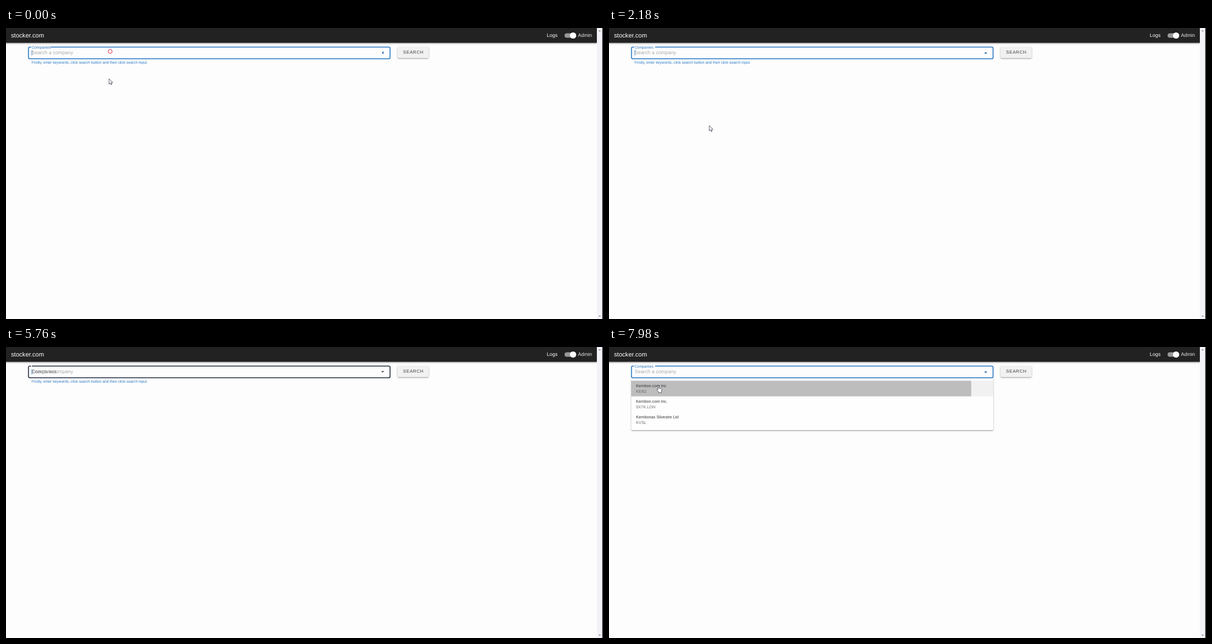
Write an HTML page that moves like this. It is 1072 by 522 pixels and loops after 8 s.

```html
<!DOCTYPE html>
<html lang="en">
<head>
<meta charset="utf-8">
<title>stocker.com</title>
<style>
  html, body { margin: 0; width: 100%; height: 100%; overflow: hidden; background: #fdfdfd; }
  svg { display: block; width: 1072px; height: 522px; }
  text { font: 8.93px "Liberation Sans", Arial, sans-serif; text-rendering: geometricPrecision; white-space: pre; }
  .option { font-size: 7.25px; fill: #333; }
  .ticker { font-size: 7.25px; fill: #6b6b6b; }
</style>
</head>
<body>
<svg viewBox="0 0 1072 522">
  <defs>
    <filter id="shadow" x="-10%" y="-30%" width="120%" height="170%">
      <feDropShadow dx="0" dy="1.2" stdDeviation="1.2" flood-opacity=".4"/>
    </filter>
    <clipPath id="buttonClip"><rect x="703" y="33.5" width="56" height="20.3" rx="2.2"/></clipPath>
    <clipPath id="rowClip"><rect x="40" y="60.5" width="650" height="28"/></clipPath>
  </defs>
  <rect width="1072" height="522" fill="#fdfdfd"/>

  <rect x="-8" y="-4" width="1069" height="30.6" fill="#242424" filter="url(#shadow)"/>
  <text x="9" y="17" fill="#fff" style="font-size:11.1px">stocker.com</text>
  <text x="971" y="16.4" fill="#fff">Logs</text>
  <rect x="1003" y="9.6" width="19" height="7.8" rx="3.9" fill="#989898"/>
  <circle cx="1018.3" cy="13.5" r="5.6" fill="#fff"/>
  <text x="1027" y="16.4" fill="#e6e6e6">Admin</text>

  <rect x="1061" width="9.6" height="522" fill="#f3f2f8"/>
  <rect x="1070.7" width="1.3" height="522" fill="#17171c"/>
  <path d="M1064 6l2-2 2 2zM1064 516l2 2 2-2z" fill="#777"/>

  <rect id="outline" x="40.4" y="34.2" width="649.2" height="21" rx="2.2" fill="none"/>
  <rect id="notch" x="44.8" y="33" height="2.4" fill="#fdfdfd"/>
  <text id="placeholder" x="46" y="47.3" fill="#a9a9a9">Search a company</text>
  <text id="typed" x="46" y="47.3" fill="#333"></text>
  <text id="label" x="46">Companies</text>
  <rect id="caret" y="39.7" width=".8" height="9.6" fill="#2a74bd"/>
  <path id="arrow" d="M-2.9-1.4H2.9L0 1.5Z"/>
  <text id="helper" x="46" y="63.5" style="font-size:6.7px">Firstly, enter keywords, click search button and then click search input.</text>

  <rect id="button" x="703" y="33.5" width="56" height="20.3" rx="2.2" filter="url(#shadow)"/>
  <g clip-path="url(#buttonClip)"><circle id="buttonRipple" cx="746" cy="44" fill="#adadad"/></g>
  <text x="713" y="46.4" fill="#3a3a3a" style="font-size:7.81px;letter-spacing:.75px">SEARCH</text>

  <g id="menu">
    <rect x="40" y="56.5" width="650" height="92.5" rx="2" fill="#fefefe" filter="url(#shadow)"/>
    <rect id="hover" x="40" y="60.5" width="650" height="28" fill="#f1f1f1"/>
    <g clip-path="url(#rowClip)"><circle id="rowRipple" cx="90" cy="74" fill="#bdbdbd"/></g>
    <g id="options"></g>
  </g>

  <circle id="ring" fill="none" stroke="#dc2340" stroke-width="1"/>
  <path id="pointer" d="M0 0V9.6L2.2 7.6 3.8 10.9 5.2 10.2 3.8 7H6.7Z" fill="#fff" stroke="#34344a" stroke-width=".8"/>
  <path id="hand" d="M-1 1a1 1 0 0 1 2 0V5l3.6.8q1.5.5 1.3 2L5.2 11v2H.2v-1.4L-3 8.2q-.5-1 .6-1.4l1.4.8Z" fill="#fff" stroke="#34344a" stroke-width=".8"/>
</svg>
<script>
const LOOP = 8000;
const FIRST_FOCUS = -118, SUBMIT = 4814, REFOCUS = 5758;
const MENU_OPEN = 5870, PRESS = 4640, PICK = 7653;
const WORD = 'Kembon', TYPE_START = 2560, TYPE_STEP = 130;
const BLUE = [37, 116, 193], GREY = [105, 105, 105], DARK = [32, 38, 56], PALE = [178, 182, 188];

// time, x, y of the pointer tip
const PATH = [
  [-118, 187, 42], [0, 185, 91], [420, 180, 175], [3500, 180, 175],
  [4150, 640, 72], [4560, 746, 46], [4960, 746, 46], [5200, 660, 90],
  [5480, 190, 112], [5650, 112, 46], [5960, 110, 46], [6300, 106, 68],
  [6820, 102, 71], [7400, 102, 71], [7620, 89, 69], [8000, 89, 69]
];
const CLICKS = [[FIRST_FOCUS, 187, 42], [SUBMIT, 746, 44], [REFOCUS, 112, 44]];
const OPTIONS = [
  ['Kembon.com Inc', 'KEBZ'], ['Kembon.com Inc.', '0X7K.LON'], ['Kembonas Silvestre Ltd', 'KVSL']
];

const el = {};
document.querySelectorAll('[id]').forEach(node => el[node.id] = node);
OPTIONS.forEach(([name, ticker], i) => {
  const y = 72 + i * 28;
  el.options.innerHTML += `<text class="option" x="48.5" y="${y}">${name}</text>` +
    `<text class="ticker" x="48.5" y="${y + 9.8}">${ticker}</text>`;
});

const set = (node, attrs) => { for (const k in attrs) node.setAttribute(k, attrs[k]); };
const show = (node, on) => node.setAttribute('visibility', on ? 'visible' : 'hidden');
const clamp = x => Math.min(1, Math.max(0, x));
const phase = (t, start, length) => clamp((t - start) / length);
const easeOut = x => 1 - (1 - x) ** 3;
const smooth = x => x * x * (3 - 2 * x);
const mix = (a, b, p) => a + (b - a) * p;
const blend = (a, b, p) => `rgb(${a.map((v, i) => Math.round(mix(v, b[i], p)))})`;

function pointerAt(t) {
  const i = Math.max(1, PATH.findIndex(p => p[0] > t));
  const [t0, x0, y0] = PATH[i - 1], [t1, x1, y1] = PATH[i];
  const p = smooth(phase(t, t0, t1 - t0));
  return [mix(x0, x1, p), mix(y0, y1, p)];
}

function drawField(t, overInput) {
  const focused = t < SUBMIT || t >= REFOCUS;
  const focusStart = t < SUBMIT ? FIRST_FOCUS : REFOCUS;
  const shrink = focused ? easeOut(phase(t, focusStart, 200)) : 1 - easeOut(phase(t, SUBMIT, 200));
  const tint = focused ? phase(t, focusStart, 90) : 0;

  const count = t < SUBMIT ? Math.max(0, Math.min(WORD.length, Math.floor((t - TYPE_START) / TYPE_STEP) + 1)) : 0;
  const text = WORD.slice(0, count);
  if (el.typed.textContent !== text) el.typed.textContent = text;
  show(el.placeholder, focused && !count);

  set(el.outline, {
    stroke: focused ? blend(DARK, BLUE, tint) : blend(overInput ? DARK : BLUE, overInput ? DARK : PALE, phase(t, SUBMIT, 90)),
    'stroke-width': focused ? 1.6 : .8
  });
  set(el.notch, { width: 38 * shrink });
  set(el.label, { y: mix(47.3, 36.6, shrink), fill: blend(GREY, BLUE, shrink) });
  el.label.style.fontSize = mix(8.93, 6.7, shrink) + 'px';
  set(el.helper, { fill: focused ? blend(BLUE, BLUE, 0) : blend(GREY, GREY, 0) });

  const lastKey = TYPE_START + TYPE_STEP * (WORD.length - 1);
  const typing = count && t < lastKey + 500;
  const blinkStart = count ? lastKey : focusStart;
  show(el.caret, focused && t < PICK && (typing || Math.floor((t - blinkStart) / 500) % 2 === 0));
  set(el.caret, { x: 46.2 + (count ? el.typed.getComputedTextLength() : 0) });

  const open = t < SUBMIT ? phase(t, -50, 100) : t < MENU_OPEN ? 1 - phase(t, SUBMIT, 92) : phase(t, MENU_OPEN, 100);
  set(el.arrow, {
    transform: `translate(676.4 44.4) rotate(${180 * smooth(open)})`,
    fill: open > 0 ? blend(BLUE, DARK, .2) : blend(GREY, DARK, .2)
  });
}

function draw(t) {
  const [x, y] = pointerAt(t);
  const menuOpen = t >= MENU_OPEN;
  const overInput = x > 40 && x < 690 && y > 34 && y < 56;
  const overButton = x > 703 && x < 759 && y > 34 && y < 54;
  const overRow = menuOpen && y > 60;

  drawField(t, overInput);

  set(el.button, { fill: overButton ? '#d8d8d8' : '#f1f1f1' });
  set(el.buttonRipple, {
    r: t >= PRESS ? 53 * easeOut(phase(t, PRESS, 550)) : 0,
    opacity: 1 - phase(t, 4900, 300)
  });

  show(el.menu, menuOpen);
  set(el.hover, { opacity: overRow ? 1 : 0 });
  set(el.rowRipple, { r: 600 * easeOut(phase(t, PICK, 550)) });

  const click = CLICKS.find(([start]) => t >= start && t < start + 250);
  show(el.ring, click);
  if (click) set(el.ring, { cx: click[1], cy: click[2], r: Math.min(3.5, (t - click[0]) * .03) });

  const hidden = overInput || (t >= 2480 && t < 3520);
  const handOn = overButton || overRow;
  show(el.pointer, !hidden && !handOn);
  show(el.hand, !hidden && handOn);
  for (const node of [el.pointer, el.hand]) set(node, { transform: `translate(${x} ${y})` });
}

function tick() {
  draw(performance.now() % LOOP);
  requestAnimationFrame(tick);
}
tick();
</script>
</body>
</html>
```
